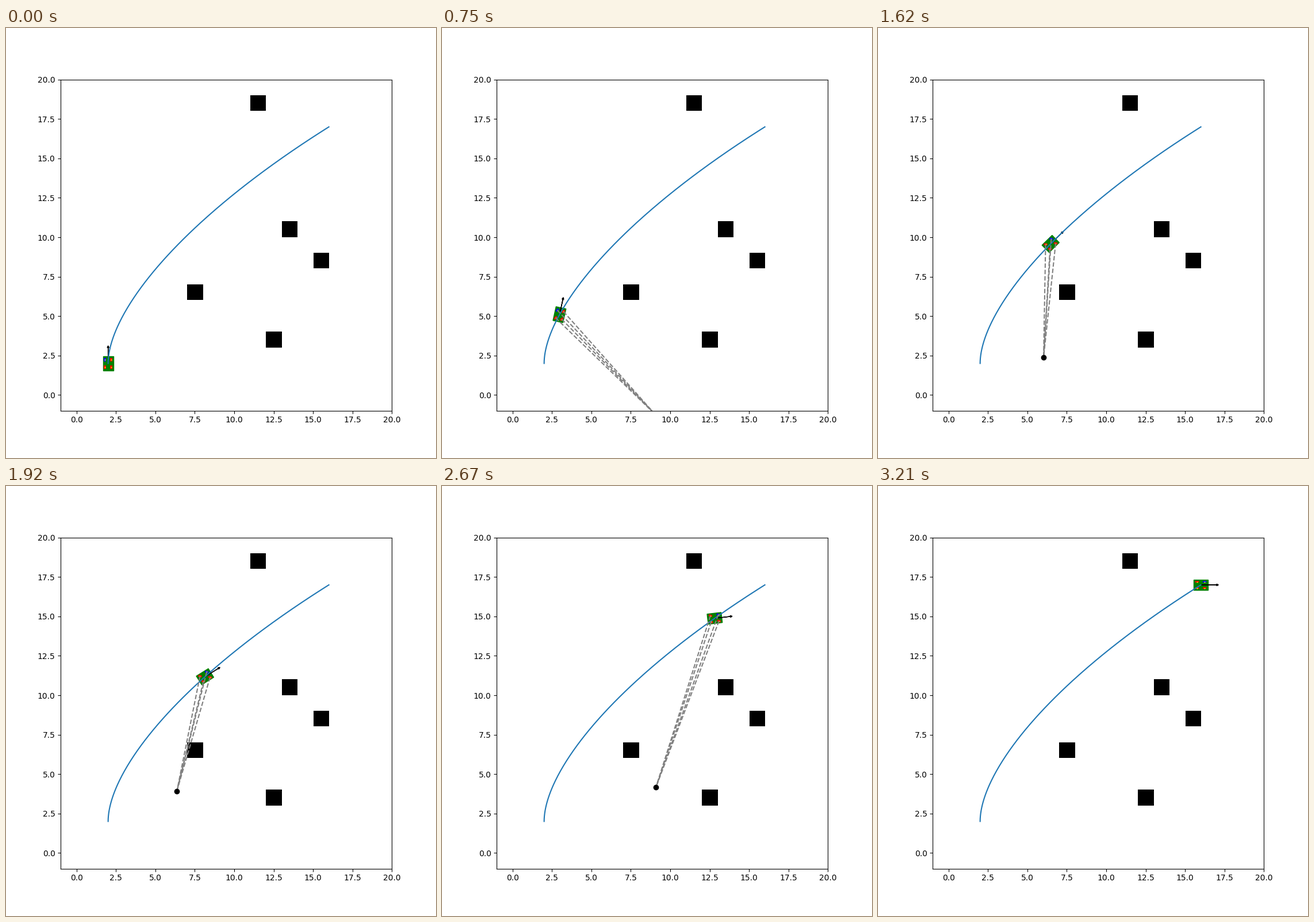
These frames come from a looping animation (748x748 px, 3.24 s). A matplotlib script:

```python
from itertools import product

import numpy as np
import matplotlib.pyplot as plt
from matplotlib.animation import FuncAnimation
from matplotlib.patches import Polygon

FRAMES, INTERVAL = 108, 30
SIZE = 20
OBSTACLES = [(11, 18), (13, 10), (15, 8), (7, 6), (12, 3)]
BODY = (0.9, 0.65)
WHEEL = (0.22, 0.13)
MOUNTS = np.array(list(product((0.25, -0.25), (0.2, -0.2))))


def smooth(s):
    return s * s * (3 - 2 * s)


def position(s):
    x = 2 + 14 * s**2 * (1 + (1 - s) * (0.23 + 0.56 * s))
    y = 2 + 15 * (0.71 * s + 0.29 * smooth(s))
    return np.array([x, y])


def heading(s):
    return np.pi / 2 * (1 - smooth(s))


def rotate(points, angle):
    c, s = np.cos(angle), np.sin(angle)
    return np.asarray(points) @ np.array([[c, s], [-s, c]])


def box(size, center, angle):
    corners = np.array([(-1, -1), (1, -1), (1, 1), (-1, 1)]) * np.array(size) / 2
    return rotate(corners, angle) + center


def turning_center(s):
    # The sideways distance grows as the turn rate s(1 - s) fades
    speed = 1.33 + 0.13 * np.cos(2 * np.pi * (s - 0.95))
    forward = -5.36 + 5 * (s - 0.55) ** 2
    side = -speed / (s * (1 - s))
    return position(s) + rotate((forward, side), heading(s))


fig, ax = plt.subplots(figsize=(7.48, 7.48), dpi=100)

grid = np.zeros((SIZE, SIZE))
for col, row in OBSTACLES:
    grid[row, col] = 1
ax.imshow(grid, cmap="binary", origin="lower", extent=(0, SIZE, 0, SIZE))
ax.set_xlim(-1, SIZE)
ax.set_ylim(-1, SIZE)

ax.plot(*position(np.linspace(0, 1, 200)), color="tab:blue")

blank = np.zeros((4, 2))
body = ax.add_patch(Polygon(blank, facecolor="green", edgecolor="green"))
wheels = [ax.add_patch(Polygon(blank, facecolor=c, edgecolor="none"))
          for c in ("blue", "red", "red", "red")]
arrow = ax.arrow(2, 2, 0, 1, head_width=0.12, head_length=0.12, color="black")
hubs, = ax.plot([], [], "o", color="yellow", markersize=1.5, markeredgewidth=0)
rays = [ax.plot([], [], "--", color="gray")[0] for _ in MOUNTS]
pivot, = ax.plot([], [], "ko")


def update(i):
    s = i / (FRAMES - 1)
    p, angle = position(s), heading(s)
    mounts = rotate(MOUNTS, angle) + p
    turning = 0 < i < FRAMES - 1

    body.set_xy(box(BODY, p, angle))
    arrow.set_data(x=p[0], y=p[1], dx=np.cos(angle), dy=np.sin(angle))
    hubs.set_data(*mounts.T)

    center = turning_center(s) if turning else p
    pivot.set_data([center[0]], [center[1]])
    pivot.set_visible(turning)
    for wheel, ray, m in zip(wheels, rays, mounts):
        dx, dy = center - m
        steer = np.arctan2(dx, -dy) if turning else angle
        wheel.set_xy(box(WHEEL, m, steer))
        ray.set_data([m[0], center[0]], [m[1], center[1]])
        ray.set_visible(turning)
    return [body, arrow, hubs, pivot, *wheels, *rays]


anim = FuncAnimation(fig, update, frames=FRAMES, interval=INTERVAL,
                     repeat=True, repeat_delay=0)
plt.show()
```
